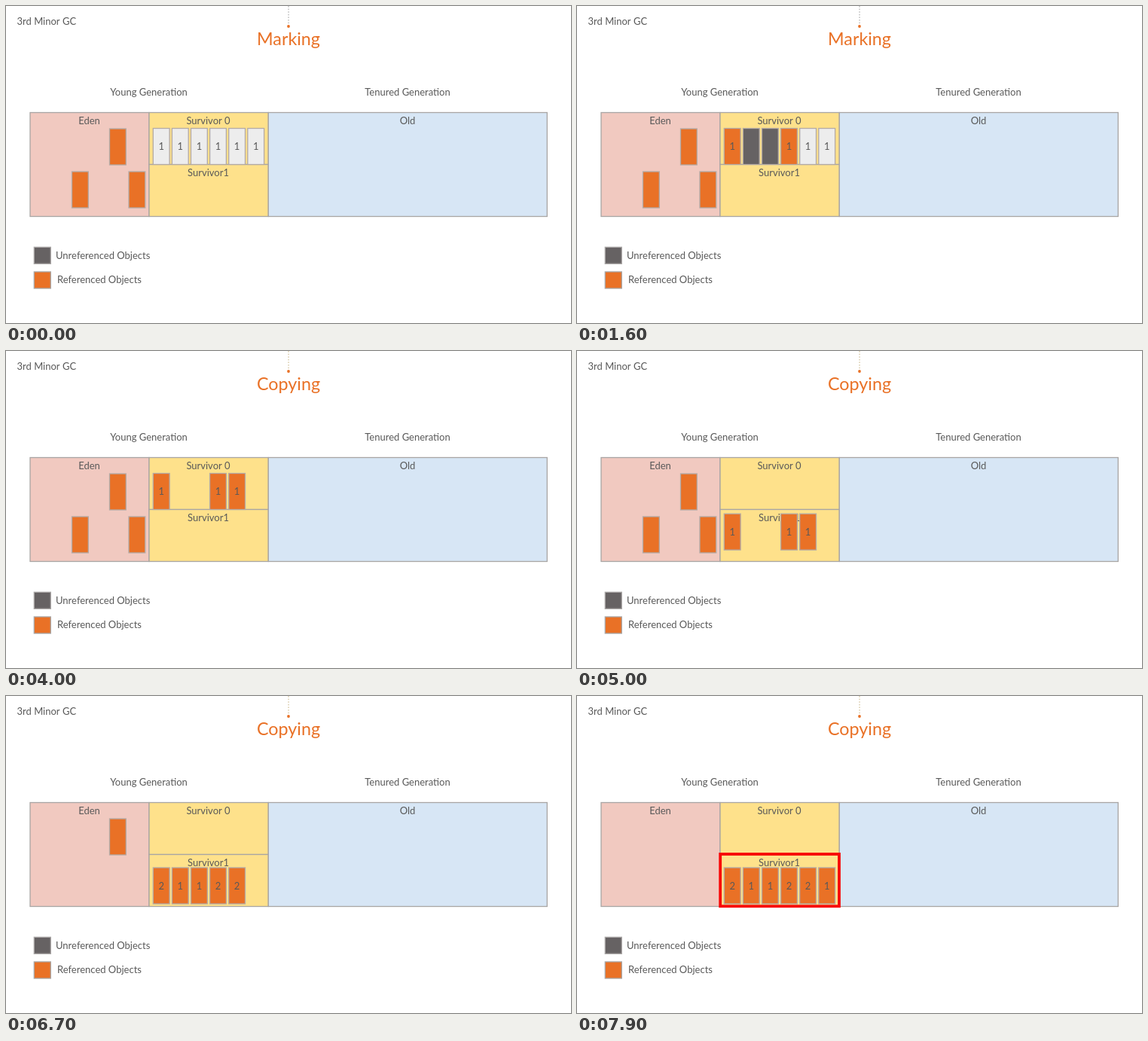
Write an HTML page with a canvas that moves like this. It is 750 by 421 pixels and loops after 8000 ms.

```html
<!DOCTYPE html>
<html lang="en">
<head>
<meta charset="utf-8">
<title>Minor GC</title>
<style>
  html, body { margin: 0; width: 100%; height: 100%; overflow: hidden; background: #fff; }
  canvas { display: block; }
</style>
</head>
<body>
<canvas id="stage" width="750" height="421"></canvas>
<script>
const ctx = document.getElementById('stage').getContext('2d');
const LOOP = 8000;
const ORANGE = '#e97126', GRAY = '#666263', WHITE = '#ededed', INK = '#595959', EDGE = '#a8a5a4';
const DELETE_AT = 2700, COPY_AT = 3700, AGE_AT = 5300, HIGHLIGHT_AT = 7400;
const TOP_ROW = 162.5, BOTTOM_ROW = 228;

const slotX = i => 195.3 + 25.1 * i;

// Objects already in survivor space: when each is marked, and whether it lives.
const survivors = [
  { mark: 500, live: true },
  { mark: 600, live: false },
  { mark: 1000, live: false },
  { mark: 1400, live: true },
  { mark: 1800, live: true },
  { mark: 1900, live: false }
];

// Objects in Eden: start position, target slot, move interval, time of first age.
const newcomers = [
  { x: 87.5, y: 220, slot: 1, from: 5400, to: 5930, aged: 6000 },
  { x: 163, y: 220, slot: 2, from: 6000, to: 6500, aged: 6600 },
  { x: 137.5, y: 163, slot: 5, from: 6750, to: 7250, aged: 7300 }
];

function ease(t, from, to) {
  const p = Math.min(1, Math.max(0, (t - from) / (to - from)));
  return p * p * (3 - 2 * p);
}

const mix = (a, b, p) => a + (b - a) * p;

function box(x, y, w, h, fill, stroke = EDGE, lineWidth = 1.3) {
  ctx.fillStyle = fill;
  ctx.fillRect(x, y, w, h);
  ctx.strokeStyle = stroke;
  ctx.lineWidth = lineWidth;
  ctx.strokeRect(x, y, w, h);
}

function text(str, x, y, align = 'center', size = 13, color = INK) {
  ctx.font = `${size}px Lato, sans-serif`;
  ctx.textAlign = align;
  ctx.fillStyle = color;
  ctx.fillText(str, x, y);
}

function object(x, y, fill, age) {
  box(x, y, 21.8, 48, fill, '#b3aaa5');
  if (age) text(age, x + 10.9, y + 28.5);
}

function drawTitle(t) {
  const copying = t >= COPY_AT;
  ctx.fillStyle = copying ? '#d5c5a0' : '#b5b5b5';
  for (let y = 0; y < 25; y += 3.6) ctx.fillRect(374.4, y, 1.3, 1.6);
  ctx.fillStyle = ORANGE;
  ctx.beginPath();
  ctx.arc(375, 27, 1.9, 0, 7);
  ctx.fill();
  const title = copying ? 'Copying' : t >= DELETE_AT ? 'Deleting' : 'Marking';
  text(title, 375, 52, 'center', 23.3, ORANGE);
}

function drawHeap() {
  text('3rd Minor GC', 14.5, 24.5, 'left');
  text('Young Generation', 189.5, 118.8);
  text('Tenured Generation', 533, 118.8);
  box(32, 141.5, 158, 138, '#f1c9c0');
  box(190, 141.5, 158.3, 69, '#fee18b');
  box(190, 210.5, 158.3, 69, '#fee18b');
  box(348.3, 141.5, 370, 138, '#d7e6f5');
  text('Eden', 110.5, 157.3);
  text('Survivor 0', 268.5, 157.3);
  text('Survivor1', 268.5, 226.3);
  text('Old', 533, 157.3);
  box(37.3, 320.3, 22, 22, GRAY);
  box(37.3, 353, 22, 22, ORANGE);
  text('Unreferenced Objects', 66, 335.8, 'left');
  text('Referenced Objects', 68, 368.3, 'left');
}

function drawObjects(t) {
  const y = mix(TOP_ROW, BOTTOM_ROW, ease(t, 4600, 5150));
  survivors.forEach(({ mark, live }, i) => {
    if (!live && t >= DELETE_AT) return;
    const marked = t >= mark;
    const fill = !marked ? WHITE : live ? ORANGE : GRAY;
    const age = marked && !live ? '' : t >= AGE_AT ? '2' : '1';
    object(slotX(i), y, fill, age);
  });
  for (const n of newcomers) {
    const p = ease(t, n.from, n.to);
    object(mix(n.x, slotX(n.slot), p), mix(n.y, BOTTOM_ROW, p), ORANGE, t >= n.aged ? '1' : '');
  }
}

function drawHighlight(t) {
  ctx.globalAlpha = ease(t, HIGHLIGHT_AT - 100, HIGHLIGHT_AT + 300);
  box(190.2, 210, 157.8, 69.2, 'transparent', '#f80606', 3.8);
  ctx.globalAlpha = 1;
}

function frame() {
  const t = performance.now() % LOOP;
  ctx.fillStyle = '#fff';
  ctx.fillRect(0, 0, 750, 421);
  drawTitle(t);
  drawHeap();
  drawObjects(t);
  drawHighlight(t);
  requestAnimationFrame(frame);
}
frame();
</script>
</body>
</html>
```
